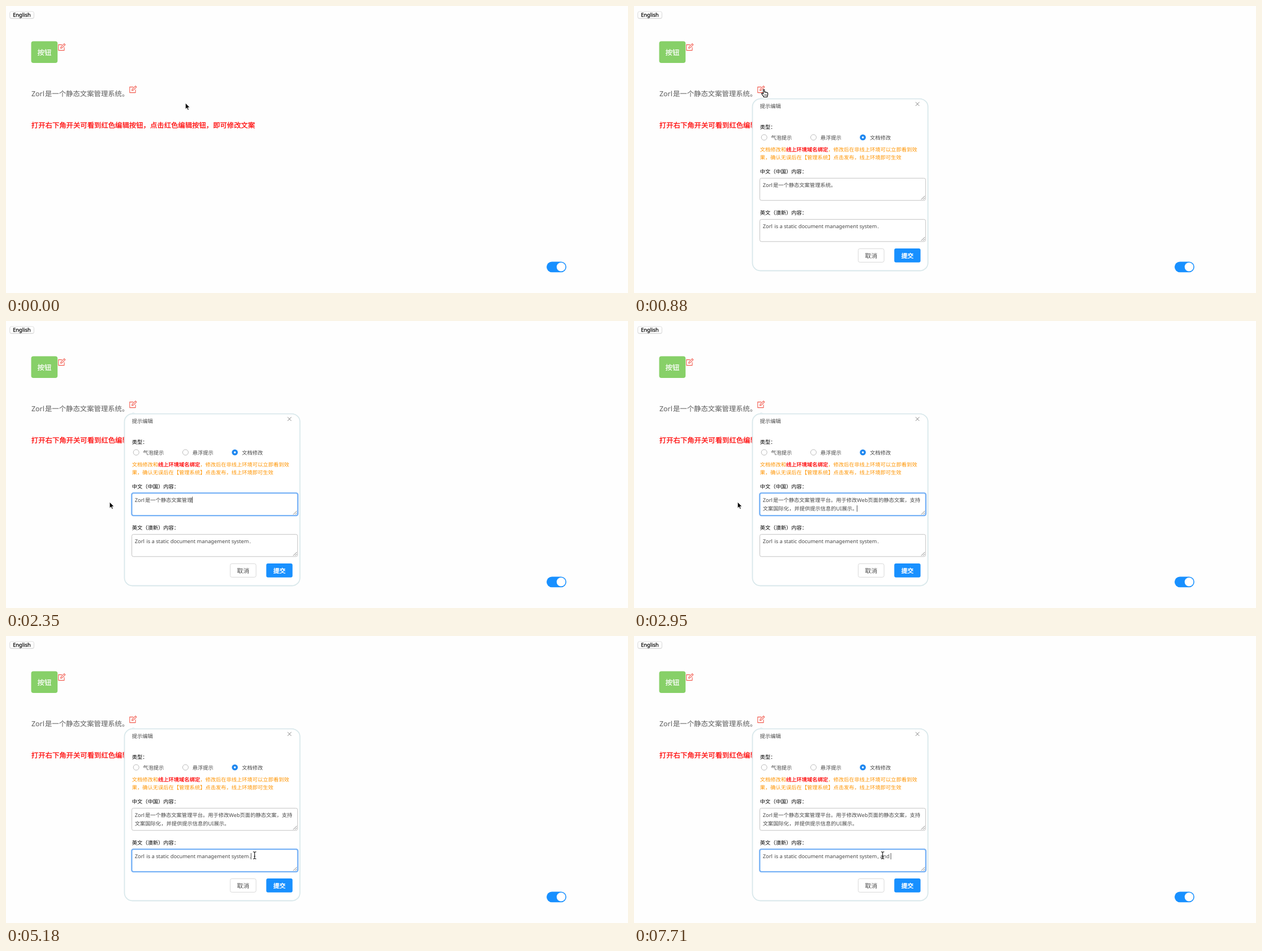
An HTML page for the animation above (8 s loop, 1100 px wide and 509 px high).

```html
<!DOCTYPE html>
<html lang="zh-CN">
<head>
<meta charset="utf-8">
<title>文案编辑</title>
<style>
html, body { margin: 0; width: 100%; height: 100%; overflow: hidden; background: #fefefe; }
svg { display: block; width: 100vw; height: 100vh; }
text {
  font: 9.27px "Noto Sans", "Noto Sans CJK SC", "Noto Sans CJK", sans-serif;
  text-rendering: geometricPrecision;
  color: #484848;
  fill: currentColor;
}
.big { font-size: 12.36px; color: #5c5c5c; }
.mid { font-size: 10.8px; }
.dark { color: #000; }
.red { color: #f00; fill: #f00; }
.warn { color: #ff9400; }
.white { color: #fff; }
.medium { stroke: currentColor; stroke-width: .25; }
.strong { stroke: currentColor; stroke-width: .45; }
.box { fill: #fff; stroke: #c4c4c4; }
.ring { fill: none; stroke: #79b3f6; stroke-width: 2.4; }
.line { fill: none; stroke: #777; stroke-width: .9; }
.icon { fill: none; stroke: #f25c50; stroke-width: 1.1; stroke-linejoin: round; }
</style>
</head>
<body>
<svg viewBox="0 0 1100 509" lang="zh-CN">
  <defs>
    <g id="edit" class="icon">
      <path d="M7.2 2.6H.8V12.6H11V7.2"/>
      <path d="M4.6 9 5.2 6.6 11 .8 12.8 2.6 7 8.4Z"/>
    </g>
    <path id="grip" class="line" d="M0 6.5 6.5 0M3.4 6.5 6.5 3.4"/>
  </defs>

  <rect x="6.5" y="10.2" width="43.2" height="12.6" rx="3" fill="#dedede"/>
  <rect x="6.9" y="9.8" width="42.4" height="12" rx="2.6" fill="#fff" stroke="#d2d2d2" stroke-width=".7"/>
  <text class="dark medium" x="12.2" y="19.2">English</text>

  <rect x="44.5" y="62.4" width="46.7" height="38.5" rx="4" fill="#87d068"/>
  <text class="big white medium" x="55.6" y="86.7">按钮</text>
  <use href="#edit" x="92" y="66"/>

  <text class="big" x="45" y="160.3">Zorl<tspan x="69">是一个静态文案管理系统。</tspan></text>
  <use href="#edit" x="218" y="141"/>
  <text class="big red medium" x="44.8" y="215.5">打开右下角开关可看到红色编辑按钮，点击红色编辑按钮，即可修改文案</text>

  <rect x="956" y="453.4" width="35" height="18.8" rx="9.4" fill="#1890ff"/>
  <circle cx="981.6" cy="462.8" r="7.8" fill="#fff"/>

  <g id="popup">
    <path d="M220 165 225 161.5 230 165Z" fill="#eaf3f5"/>
    <rect x="209.5" y="164.7" width="310.3" height="304.8" rx="14" fill="#fff" stroke="#d9e8eb" stroke-width="1.8"/>
    <text x="222.8" y="180.7">提示编辑</text>
    <path class="line" d="M498 170.5 504.6 177.1M504.6 170.5 498 177.1"/>
    <text class="dark" x="222.8" y="217.6">类型：</text>
    <g fill="#fff" stroke="#b4b4b4" stroke-width=".9">
      <circle cx="230.2" cy="233" r="5"/>
      <circle cx="317.4" cy="233" r="5"/>
    </g>
    <circle cx="404.7" cy="233" r="5.3" fill="#2088f0"/>
    <circle cx="404.7" cy="233" r="1.8" fill="#fff"/>
    <text x="242.3" y="236.6">气泡提示</text>
    <text x="329.7" y="236.6">悬浮提示</text>
    <text x="417.2" y="236.6">文档修改</text>
    <text class="warn" x="222.7" y="257.8">文档修改和<tspan class="red medium">线上环境域名绑定</tspan>，修改后在非线上环境可以立即看到效</text>
    <text class="warn" x="222.7" y="271.8">果，确认无误后在【管理系统】点击发布，线上环境即可生效</text>

    <text class="dark" x="222.7" y="297.4">中文（中国）内容：</text>
    <rect class="box" x="222.5" y="305.4" width="293.2" height="39.4" rx="3"/>
    <rect class="ring" id="ring1" x="222.3" y="305.1" width="293.8" height="40" rx="3"/>
    <use href="#grip" x="508" y="336.8"/>
    <text x="227.8" y="320.6">Zorl<tspan id="zh1" x="246"></tspan></text>
    <text id="zh2" x="227.8" y="336">文</text>

    <text class="dark" x="222.7" y="370.4">英文（澳新）内容：</text>
    <rect class="box" x="222.5" y="378.4" width="293.2" height="39.4" rx="3"/>
    <rect class="ring" id="ring2" x="222.3" y="378.1" width="293.8" height="40" rx="3"/>
    <use href="#grip" x="508" y="409.8"/>
    <text x="227.8" y="393.8">Zorl<tspan x="248.3">is a static document management system</tspan><tspan id="tail" x="430.4"></tspan></text>

    <rect id="caret" width=".9" height="11.2" fill="#444"/>

    <rect x="396.5" y="430.4" width="45.7" height="24" rx="3" fill="#fff" stroke="#d9d9d9"/>
    <text class="mid" x="408.6" y="447">取消</text>
    <rect x="460.3" y="430" width="46.4" height="24.7" rx="3" fill="#1890ff"/>
    <text class="mid white strong" x="472.8" y="447">提交</text>
  </g>

  <g id="arrow"><path transform="scale(.92)" d="M0 0V12L2.8 9.5 4.6 13.7 6.6 12.8 4.8 8.7H8.6Z" fill="#000" stroke="#fff" stroke-width=".9"/></g>
  <g id="hand"><path d="M-1.4 5.6V.8Q-1.4-.4-.3-.4T.8.8V4.2Q1.9 3.5 2.8 4.6 4 4 4.8 5 6.6 4.7 6.6 6.4V8.8Q6.5 10.5 5.5 11.6V13H-.6V12Q-2.4 10.4-4 7.8-4.8 6.4-3.7 6-2.8 5.8-1.4 7.5Z" fill="#fff" stroke="#000" stroke-width="1.1" stroke-linejoin="round"/><path d="M1 8.2V10.8M2.7 8.2V10.8M4.4 8.2V10.8" stroke="#000" stroke-width=".7"/></g>
  <g id="ibeam" fill="none" stroke="#111" stroke-width="1.1"><path d="M-2.8-6.3Q-.4-6.3 0-5.2 .4-6.3 2.8-6.3M0-5.2V5.2M-2.8 6.3Q-.4 6.3 0 5.2 .4 6.3 2.8 6.3M-1.3 1.8H1.3"/></g>
</svg>
<script>
const LOOP = 8000;
const el = id => document.getElementById(id);
const base = '是一个静态文案管理';
const pointer = (kind, x, y) => ({ kind, x, y });
const caret = (cx, cy) => ({ cx, cy });
const noCaret = { cx: null };

// Each row holds the time and what changes from then on.
const steps = [
  [0, { popup: false, ring1: 0, ring2: 0, zh1: base + '系统。', zh2: '', tail: '.', ...noCaret, ...pointer('arrow', 317.3, 172) }],
  [150, pointer('arrow', 302, 169)],
  [300, pointer('arrow', 264, 160)],
  [440, pointer('arrow', 238, 152)],
  [590, pointer('hand', 230, 148.5)],
  [880, { popup: true }],
  [1030, pointer('arrow', 243, 172)],
  [1180, pointer('arrow', 285, 225)],
  [1320, pointer('arrow', 338, 284)],
  [1470, pointer('ibeam', 367, 314)],
  [1610, { ring1: .6, ...caret(357, 311.5), ...pointer('ibeam', 371, 317) }],
  [1760, { ring1: 1 }],
  [1910, { zh1: base + '系统', ...caret(347.4, 311.5), kind: '' }],
  [2060, { zh1: base + '系', ...caret(338.5, 311.5) }],
  [2200, { zh1: base, ...caret(329.2, 311.5) }],
  [2350, pointer('arrow', 183.2, 321)],
  [2950, { zh1: base + '平台。用于修改Web页面的静态文案，支持', zh2: '文案国际化，并提供提示信息的UI展示。', ...caret(394, 327) }],
  [3250, pointer('arrow', 204, 329)],
  [3400, pointer('arrow', 252, 350)],
  [3550, pointer('arrow', 325, 368)],
  [3690, pointer('ibeam', 394, 384)],
  [3840, pointer('ibeam', 432, 388)],
  [3990, pointer('ibeam', 439.7, 389)],
  [4140, { ring1: .4, ring2: .6, ...caret(432.9, 385) }],
  [4290, { ring1: 0, ring2: 1 }],
  [4580, noCaret],
  [5180, caret(432.9, 385)],
  [5330, { tail: '', ...caret(430.3, 385) }],
  [5630, noCaret],
  [5780, { tail: ',', ...caret(432.9, 385) }],
  [6080, caret(435.2, 385)],
  [6680, noCaret],
  [6830, { tail: ', a', ...caret(440.6, 385) }],
  [6970, { tail: ', an', ...caret(446.2, 385) }],
  [7420, { tail: ', and', ...caret(451.9, 385) }],
  [7710, caret(453.8, 385)]
];

const setText = (id, s) => { if (el(id).textContent !== s) el(id).textContent = s; };
const show = (id, on) => { el(id).style.display = on ? '' : 'none'; };

function draw(t) {
  const s = {};
  for (const [at, change] of steps) if (at <= t) Object.assign(s, change);
  show('popup', s.popup);
  for (const id of ['zh1', 'zh2', 'tail']) setText(id, s[id]);
  for (const id of ['ring1', 'ring2']) el(id).style.opacity = s[id];
  show('caret', s.cx !== null);
  if (s.cx !== null) {
    el('caret').setAttribute('x', s.cx);
    el('caret').setAttribute('y', s.cy);
  }
  for (const id of ['arrow', 'hand', 'ibeam']) {
    show(id, s.kind === id);
    el(id).setAttribute('transform', `translate(${s.x} ${s.y})`);
  }
}

const start = performance.now();
function tick() {
  draw((performance.now() - start) % LOOP);
  requestAnimationFrame(tick);
}
tick();
</script>
</body>
</html>
```
